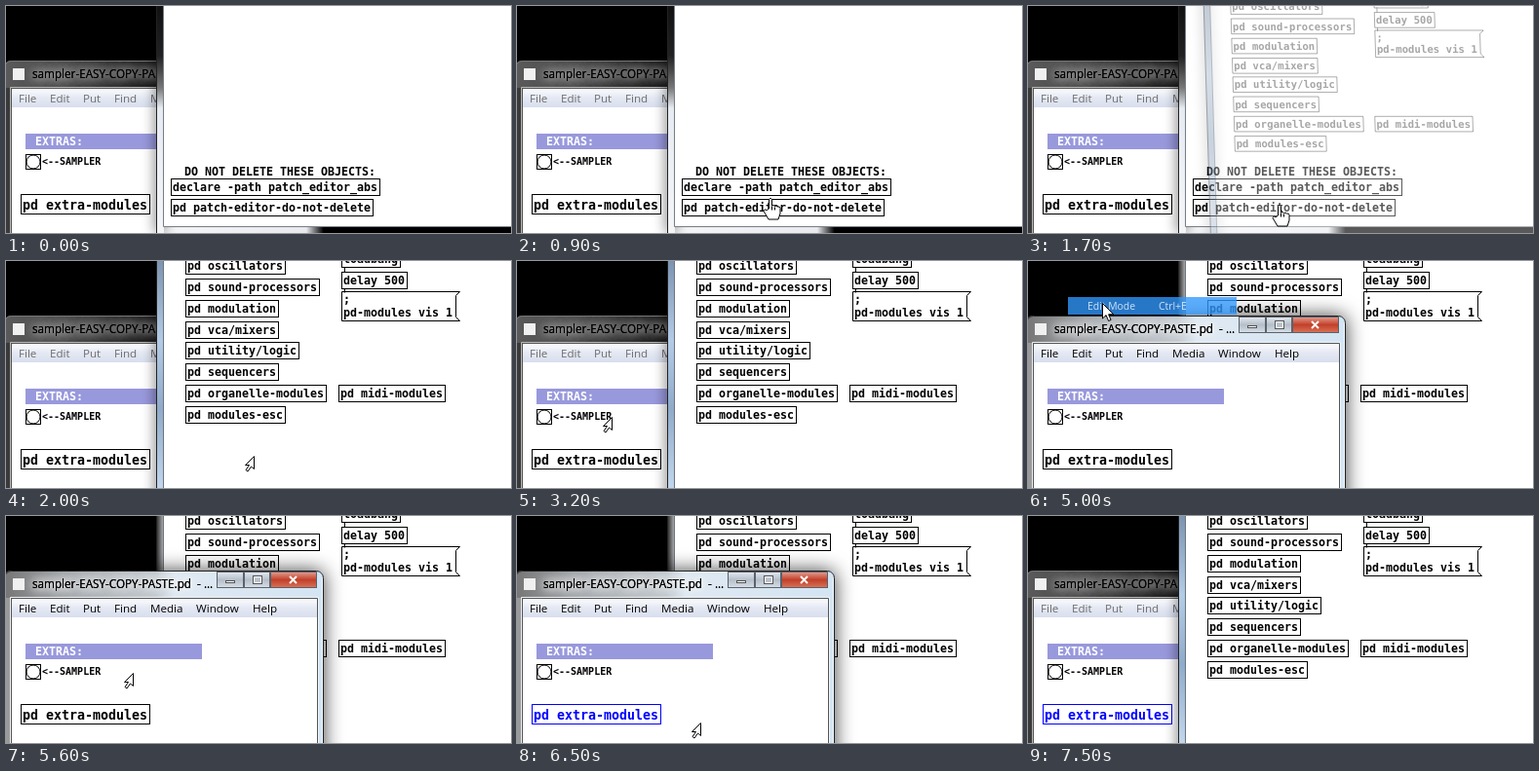
An HTML page with a canvas that plays this animation: 518 px wide and 233 px high, repeating every 8 s.

```html
<!DOCTYPE html>
<html lang="en">
<head>
<meta charset="utf-8">
<title>Patch editor</title>
<style>
html, body { margin: 0; width: 100%; height: 100%; overflow: hidden; background: #000; }
canvas { display: block; }
</style>
</head>
<body>
<canvas id="stage" width="518" height="233"></canvas>
<script>
const g = document.getElementById('stage').getContext('2d');
const LOOP = 8000, STEP = 100;

// time, tip x, tip y, shape from this time on
const path = [
  [0, 470, 40, ''], [100, 470, 40, 'ptr'], [800, 268, 186, 'ptr'], [900, 260, 197, 'hand'],
  [1100, 258, 204, 'hand'], [1700, 258, 204, 'hand'], [1900, 258, 204, 'ptr'],
  [2500, 240, 178, 'ptr'], [2800, 190, 130, 'ptr'], [3200, 98, 160, 'ptr'],
  [3400, 96, 162, 'ptr'], [3600, 80, 130, 'arrow'], [3900, 47, 89, 'arrow'],
  [4300, 47, 89, 'arrow'], [4600, 76, 43, 'arrow'], [5000, 76, 43, 'arrow'],
  [5200, 90, 90, 'ptr'], [5800, 152, 196, 'ptr'], [6000, 152, 196, 'ptr'],
  [6500, 189, 212, 'ptr'], [6800, 382, 195, 'ptr'], [7100, 382, 195, 'ptr'],
  [7400, 292, 90, 'ptr'], [7500, 292, 90, '']
];

function rect(x, y, w, h, fill) {
  g.fillStyle = fill;
  g.fillRect(x, y, w, h);
}
function frame(x, y, w, h, color) {
  g.strokeStyle = color;
  g.lineWidth = 1;
  g.strokeRect(x + .5, y + .5, w - 1, h - 1);
}
function line(color, ...pts) {
  g.strokeStyle = color;
  g.lineWidth = 1;
  g.beginPath();
  for (let i = 0; i < pts.length; i += 2) g.lineTo(pts[i] + .5, pts[i + 1] + .5);
  g.stroke();
}
// Gradient between two points; stops are [offset, colour]
function ramp(x0, y0, x1, y1, ...stops) {
  const r = g.createLinearGradient(x0, y0, x1, y1);
  for (const [at, color] of stops) r.addColorStop(at, color);
  return r;
}
function mono(s, x, y, color = '#000', size = 11.63) {
  g.font = `bold ${size}px "DejaVu Sans Mono", monospace`;
  g.fillStyle = color;
  g.fillText(s, x, y);
}
function ui(s, x, y, color = '#000', size = 11.6) {
  g.font = `${size}px "Open Sans", "Noto Sans", sans-serif`;
  g.fillStyle = color;
  g.fillText(s, x, y);
}
function object(s, x, y) {
  const w = s.length * 7 + 5;
  rect(x, y, w, 18, '#fff');
  frame(x, y, w, 18, '#000');
  mono(s, x + 2, y + 13);
}
function shadow(blur, alpha) {
  g.shadowBlur = blur;
  g.shadowColor = `rgba(0,0,0,${alpha})`;
}

// Left glass edge and white page, shared by both patch windows
function page(bottom, glass, edge) {
  shadow(14, .65);
  rect(154, -40, 8, bottom + 47, glass);
  shadow(0, 0);
  rect(162, -40, 480, bottom + 40, '#fff');
  line('#222', 154, -40, 154, bottom + 7);
  line(edge, 161, -40, 161, bottom, 640, bottom);
}

function editorWindow() {
  // the glass shows the sampler window and the dark desktop below it
  rect(162, 227, 356, 6, ramp(162, 0, 518, 0, [0, '#f4f5f7'], [.41, '#e8eaee'], [.46, '#000'], [1, '#000']));
  page(226, ramp(0, 0, 0, 233, [0, '#111'], [.22, '#222'], [.36, '#777'], [.45, '#e6ebf2'], [1, '#f4f5f7']), '#777d86');
  mono('DO NOT DELETE THESE OBJECTS:', 183, 174);
  object('declare -path patch_editor_abs', 169, 177);
  object('pd patch-editor-do-not-delete', 169, 198);
}

function modulesWindow(active) {
  page(320, active
    ? ramp(0, 0, 0, 233, [0, '#7d94b0'], [.35, '#b4cbe6'], [.65, '#8fabc9'], [1, '#c2d6ec'])
    : ramp(154, 0, 162, 0, [0, '#222'], [1, '#bbb']), '#6b7480');
  ['oscillators', 'sound-processors', 'modulation', 'vca/mixers', 'utility/logic',
    'sequencers', 'organelle-modules', 'modules-esc'
  ].forEach((s, i) => object('pd ' + s, 184, Math.round(-4 + i * 21.85)));
  object('pd midi-modules', 341, 127);
  line('#000', 347, 5, 347, 11);
  line('#000', 347, 28, 347, 32);
  object('loadbang', 344, -11);
  object('delay 500', 344, 11);
  line('#000', 344, 31, 465, 31, 461, 35, 461, 57, 465, 61, 344, 61, 344, 31);
  mono(';', 346, 43);
  mono('pd-modules vis 1', 346, 57);
}

function button(x, w, ...colors) {
  rect(x, 57, w, 17, ramp(0, 57, 0, 74, ...colors.map((c, i) => [i / 2, c])));
  frame(x, 57, w, 17, '#5a626c');
}

function samplerWindow(active, selected, editHot) {
  shadow(20, .75);
  g.fillStyle = active
    ? ramp(0, 0, 326, 0, [0, '#777'], [.2, '#a8acb0'], [.47, '#c4cad0'], [.53, '#dfe9f2'], [1, '#d3e4f3'])
    : ramp(0, 0, 156, 0, [0, '#5a5a5a'], [.4, '#484848'], [1, '#161616']);
  g.beginPath();
  g.roundRect(-2, 56, 328, 220, 7);
  g.fill();
  shadow(0, 0);
  g.lineWidth = 1;
  g.strokeStyle = active ? '#222' : '#777';
  g.beginPath();
  g.roundRect(-1.5, 56.5, 327, 220, 7);
  g.stroke();
  rect(0, 84, 5, 150, active ? '#9a9a9a' : '#3a3a3a');
  rect(7, 64, 12, 12, '#f0f0f0');

  g.shadowColor = active ? '#fff' : '#bbb';
  g.shadowBlur = 10;
  for (let i = 0; i < 3; i++) ui('sampler-EASY-COPY-PASTE.pd  - ...', 27, 74, '#000', 11.7);
  shadow(0, 0);

  if (active) {
    line('#f4faff', 324, 64, 324, 240);
    button(216, 28, '#e6ebf0', '#b5bfca', '#d8e0e8');
    button(244, 27, '#e6ebf0', '#b5bfca', '#d8e0e8');
    button(271, 48, '#e5a294', '#c2402a', '#d9755a');
    rect(225, 66, 10, 3, '#fff');
    frame(225, 66, 10, 3, '#555');
    frame(253, 61, 10, 9, '#555');
    frame(254, 62, 8, 7, '#fff');
    g.strokeStyle = '#fff';
    g.lineWidth = 2;
    g.beginPath();
    g.moveTo(291, 62); g.lineTo(298, 69);
    g.moveTo(298, 62); g.lineTo(291, 69);
    g.stroke();
  }

  rect(6, 85, 313, 150, '#fff');
  rect(6, 85, 313, 19, ramp(0, 85, 0, 104, [0, '#fbfcfe'], [.5, '#e4e8f3'], [1, '#d8deee']));
  line(active ? '#eef4fa' : '#bbb', 4, 240, 4, 83, 320, 83, 320, 240);
  line('#555', 5, 240, 5, 84, 319, 84, 319, 240);
  if (editHot) {
    rect(39, 87, 32, 16, '#c3c9d6');
    frame(39, 87, 32, 16, '#666');
  }
  const items = { File: 13, Edit: 45, Put: 79, Find: 111, Media: 148, Window: 195, Help: 253 };
  for (const s in items) ui(s, items[s], 99, active ? '#000' : '#6d6d6d');

  rect(20, 131, 181, 16, '#9898dc');
  mono('EXTRAS:', 30, 143, '#fff');
  frame(20, 152, 16, 16, '#000');
  g.beginPath();
  g.arc(28, 160, 7, 0, 7);
  g.stroke();
  mono('<--SAMPLER', 37, 163, '#000', 10);
  const ink = selected ? '#00f' : '#000';
  frame(15, 193, 133, 21, ink);
  mono('pd extra-modules', 17, 209, ink, 13.3);
}

function modeItem(color) {
  ui('Edit Mode', 61, 50, color, 10.4);
  ui('Ctrl+E', 134, 50, color, 10.4);
}
function highlight() {
  rect(41, 37, 173, 18, '#3399ff');
  modeItem('#fff');
}
function editMenu(hot) {
  shadow(5, .6);
  rect(38, -20, 179, 106, '#f1f1f1');
  shadow(0, 0);
  frame(38, -20, 179, 106, '#979797');
  ui('Tidy Up', 61, 5, '#000', 10.4);
  ui('Clear Console', 61, 23, '#000', 10.4);
  ui('Shift+Ctrl+L', 134, 23, '#000', 10.4);
  for (const y of [33, 60]) line('#d0d0d0', 61, y, 213, y);
  if (hot) highlight(); else modeItem('#000');
  ui('Preferences', 61, 77, '#000', 10.4);
  g.fillStyle = '#000';
  g.fill(new Path2D('M203 68l4 4-4 4z'));
}

const shapes = {
  arrow: new Path2D('M.5 .5V16l3.6-3.4L6.6 18.5l2.5-1L6.6 11.8H11.7z'),
  ptr: new Path2D('M-.5 .5L-9.5 9.5H-5.5L-9 14.5l2 1.5 3.5-5 3 2.5z'),
  hand: new Path2D('M-1.5 11V1.5q1.5-2.5 3 0V8q1.6-1.5 3 .5 1.6-1.2 3 .6 2-.8 2.5 1.4v5.5l-2 6H-2l-5-8.5q1-3 3.2-.8z')
};

function cursor(t) {
  let i = path.length - 1;
  while (path[i][0] > t) i--;
  const [t0, x0, y0, shape] = path[i];
  if (!shape) return;
  const [t1, x1, y1] = path[i + 1];
  const k = (t - t0) / (t1 - t0);
  g.save();
  g.translate(Math.round(x0 + (x1 - x0) * k), Math.round(y0 + (y1 - y0) * k));
  g.fillStyle = '#fff';
  g.strokeStyle = '#000';
  g.lineWidth = 1;
  g.fill(shapes[shape]);
  g.stroke(shapes[shape]);
  if (shape === 'hand') {
    line('#000', 1, 8, 1, 12);
    line('#000', 4, 9, 4, 12);
  }
  g.restore();
}

function draw(t) {
  rect(0, 0, 518, 233, '#000');
  const selected = t >= 5700;
  if (t >= 3500 && t < 6900) {
    modulesWindow(false);
    samplerWindow(true, selected, t >= 3900 && t < 5000);
    if (t >= 4100 && t < 5000) editMenu(t >= 4500);
    if (t >= 5000 && t < 5300) {
      g.globalAlpha = .78 - (t - 5000) / 100 * .26;
      highlight();
      g.globalAlpha = 1;
    }
  } else {
    samplerWindow(false, selected, false);
    if (t < 2000) editorWindow();
    if (t >= 1700) {
      // the new window fades in, slightly tilted, while growing to full size
      const rest = t < 2000 ? 1 - (t - 1700) / 300 : 0;
      const s = 1 - .08 * rest;
      g.save();
      g.globalAlpha = 1 - .65 * rest;
      g.transform(s, 0, .028 * rest, s, 40 * rest - 2 * rest, -4 * rest);
      modulesWindow(true);
      g.restore();
    }
  }
  cursor(t);
}

function tick() {
  draw(Math.floor(performance.now() % LOOP / STEP) * STEP);
  requestAnimationFrame(tick);
}
tick();
</script>
</body>
</html>
```
